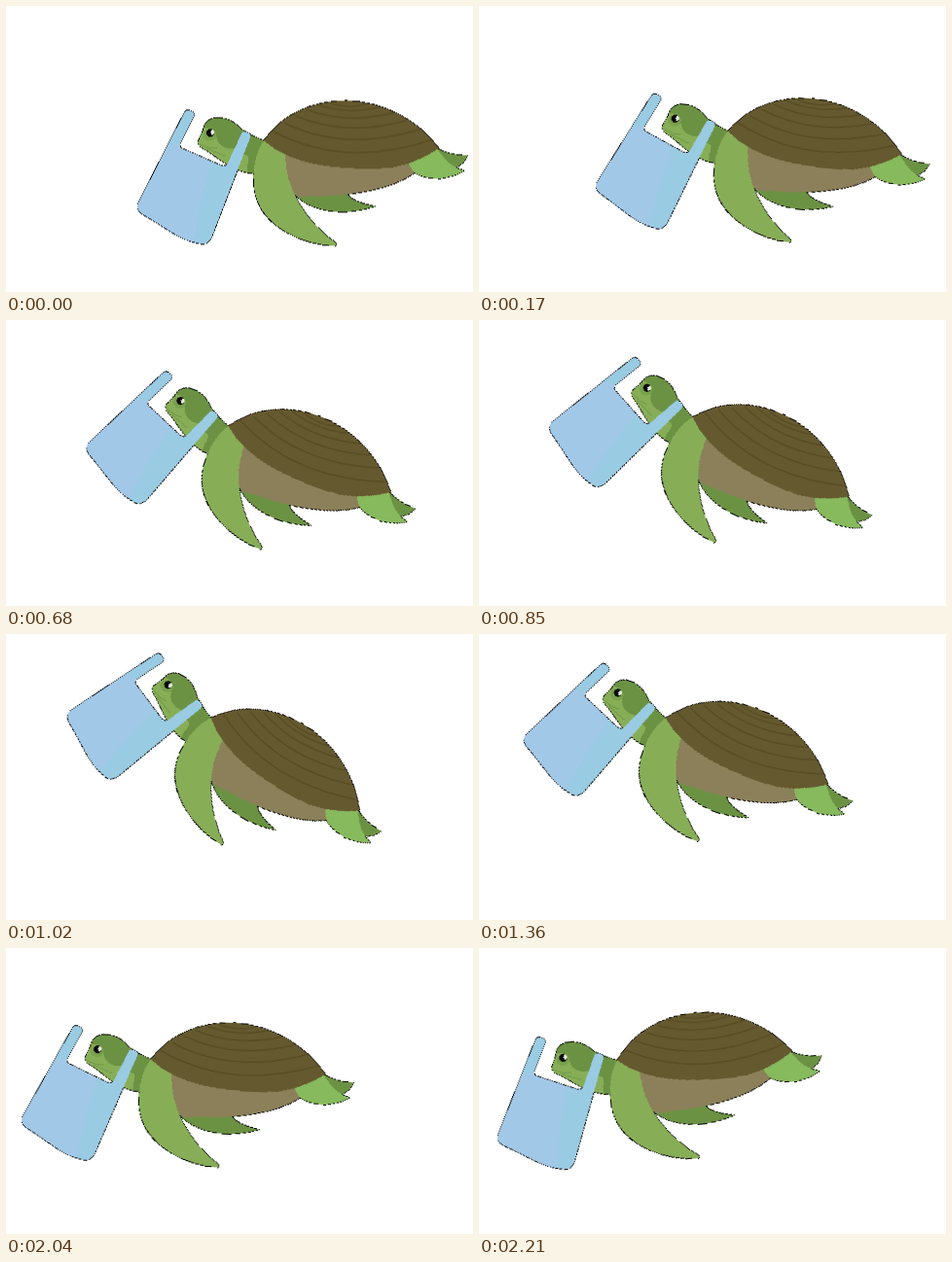
Animation, 480 px wide and 294 px high, one loop 2380 ms. Source, as an HTML page:

```html
<!DOCTYPE html>
<html lang="en">
<head>
<meta charset="utf-8">
<title>Sea turtle with a plastic bag</title>
<style>
  html, body { margin: 0; width: 100%; height: 100%; overflow: hidden; background: #fff; }
  svg { display: block; width: 100%; height: 100%; shape-rendering: crispEdges; }
  #swimmer { transform-origin: 0 0; }
  .dark { fill: #6b9243; }
  .light { fill: #87ae57; }
  .strap { fill: #99cbe3; }
  #rings { fill: none; stroke: #54481f; stroke-width: 1.1; shape-rendering: auto; }
</style>
</head>
<body>
<svg viewBox="0 0 480 294">
  <defs>
    <g id="shapes">
      <!-- far flipper and far tail fin -->
      <path class="dark" d="M296 192 C306 205 327 212 350 211 Q366 210 379 205.5 Q358 202 350 193Z"/>
      <path class="dark" d="M440 144 Q453 153 474 153.5 Q472 161 462 166 L446 165Z"/>
      <!-- near tail fin -->
      <path fill="#87b95d" d="M411 162 C418 173 430 177 446 177 Q461 175 471 169 L463 166 Q452 160 443 146Z"/>
      <!-- belly -->
      <path fill="#8b8059" d="M284 150 Q288 184 299 195.5 C345 196.5 394 190 420 171 L412 160Z"/>
      <!-- neck and head -->
      <path class="light" d="M268 139 Q253 134 243 127 C234 118 227 114.5 217 114.5 C208 115 204 121 202 129 L197 140 Q199 145 206 148 L228 163 Q240 171 258 172Z"/>
      <path class="dark" d="M268 139 Q253 134 243 127 C234 118 227 114.5 217 114.5 C208 115 204 120 203 125 Q213 124 216 130 C216 139 219 144 228 146 Q237 145 240 150 L249 154 L248 171 L258 172Z"/>
      <!-- front flipper -->
      <path class="light" d="M265 138 C254 153 252 178 257 196 C266 228 308 246 339 246 L340 244 C309 222 286 188 287 150Z"/>
      <!-- shell -->
      <path fill="#65592f" d="M265 138 C283 112 313 97 350 97 C391 98 425 119 445 146 C425 159 405 167 380 167 C340 167 294 164 265 138Z"/>
      <!-- bag -->
      <path fill="#a2c8e8" d="M183.5 109 Q186 105 190 107.5 Q195 110 193 113 L179 141 Q178 144 181 146 L222 164 Q226 165 228 161 L242 131 Q244 127 249 130 Q252 131 251 135 L238 168 L213 233 Q209 246 200 244 Q184 241 170 232 Q153 221 141 214 Q133 209 136 202Z"/>
    </g>
  </defs>
  <g id="swimmer">
    <use href="#shapes" stroke="#000" stroke-width="1.2" stroke-linejoin="round"/>
    <use href="#shapes"/>
    <path class="strap" d="M183.5 109 Q186 105 190 107.5 Q195 110 193 113 L179 141 L166 143Z"/>
    <path class="strap" d="M211 159 L222 164 Q226 165 228 161 L242 131 Q244 127 249 130 Q252 131 251 135 L238 168 L213 233 Q209 246 200 244 L193 242 Q199 196 211 159Z"/>
    <path id="rings"/>
    <path fill="none" stroke="#6b9243" stroke-width=".8" d="M198 141 Q209 147 217 145 M206 146 Q218 151 226 154"/>
    <ellipse cx="209.5" cy="132" rx="7" ry="6" fill="#78a24c"/>
    <ellipse cx="210" cy="130" rx="4.3" ry="4.2" fill="#0a0a0a"/>
    <ellipse cx="212.2" cy="129.5" rx="1.8" ry="2.6" fill="#e8eee4"/>
  </g>
</svg>
<script>
  const STEP_MS = 170, RISE_STEPS = 6, FALL_STEPS = 7, RINGS = 6;

  const mix = (a, b, t) => a + (b - a) * t;
  const mixAll = (p, q, t) => p.map((value, i) => mix(value, q[i], t));

  // Point at t on a Bezier curve of any degree.
  const bezier = (points, t) => points.length === 1 ? points[0]
    : bezier(points.slice(1).map((point, i) => mixAll(points[i], point, t)), t);

  // Shell rings: from the widest one up to the crown, closing up towards the top.
  const ring = k => {
    const t = k / (RINGS - 1), lift = 1 - (1 - t) ** 1.5;
    const x = (a, b) => mix(a, b, t), y = (a, b) => mix(a, b, lift);
    return `M${x(274, 333)} ${y(128, 99)} Q${x(348, 352)} ${y(167.5, 106)} ${x(438, 372)} ${y(137, 100)}`;
  };
  document.getElementById('rings').setAttribute('d', Array.from({ length: RINGS }, (_, k) => ring(k)).join(' '));

  // Control poses: x and y of the shell's front corner, tilt in degrees.
  const start = [265, 138.4, 0], peak = [210.6, 86.3, 29.5], end = [142, 115.6, -5.5];
  const rise = [start, [246.5, 115, 10.5], [228.5, 119, 19.3], peak];
  const fall = [peak, [216.5, 85, 18.2], [141.4, 79, 15.2], [159, 122.5, 10.6], end];

  const poseAt = step => step < RISE_STEPS
    ? bezier(rise, step / RISE_STEPS)
    : bezier(fall, (step - RISE_STEPS) / FALL_STEPS);

  const toTransform = ([x, y, tilt]) =>
    `translate(${x}px, ${y}px) rotate(${tilt}deg) translate(${-start[0]}px, ${-138}px)`;

  const steps = RISE_STEPS + FALL_STEPS + 1;
  const keyframes = Array.from({ length: steps + 1 }, (_, i) => ({
    offset: i / steps,
    transform: toTransform(poseAt(Math.min(i, steps - 1))),
    easing: 'step-end'
  }));

  document.getElementById('swimmer').animate(keyframes, {
    duration: STEP_MS * steps,
    iterations: Infinity
  });
</script>
</body>
</html>
```
